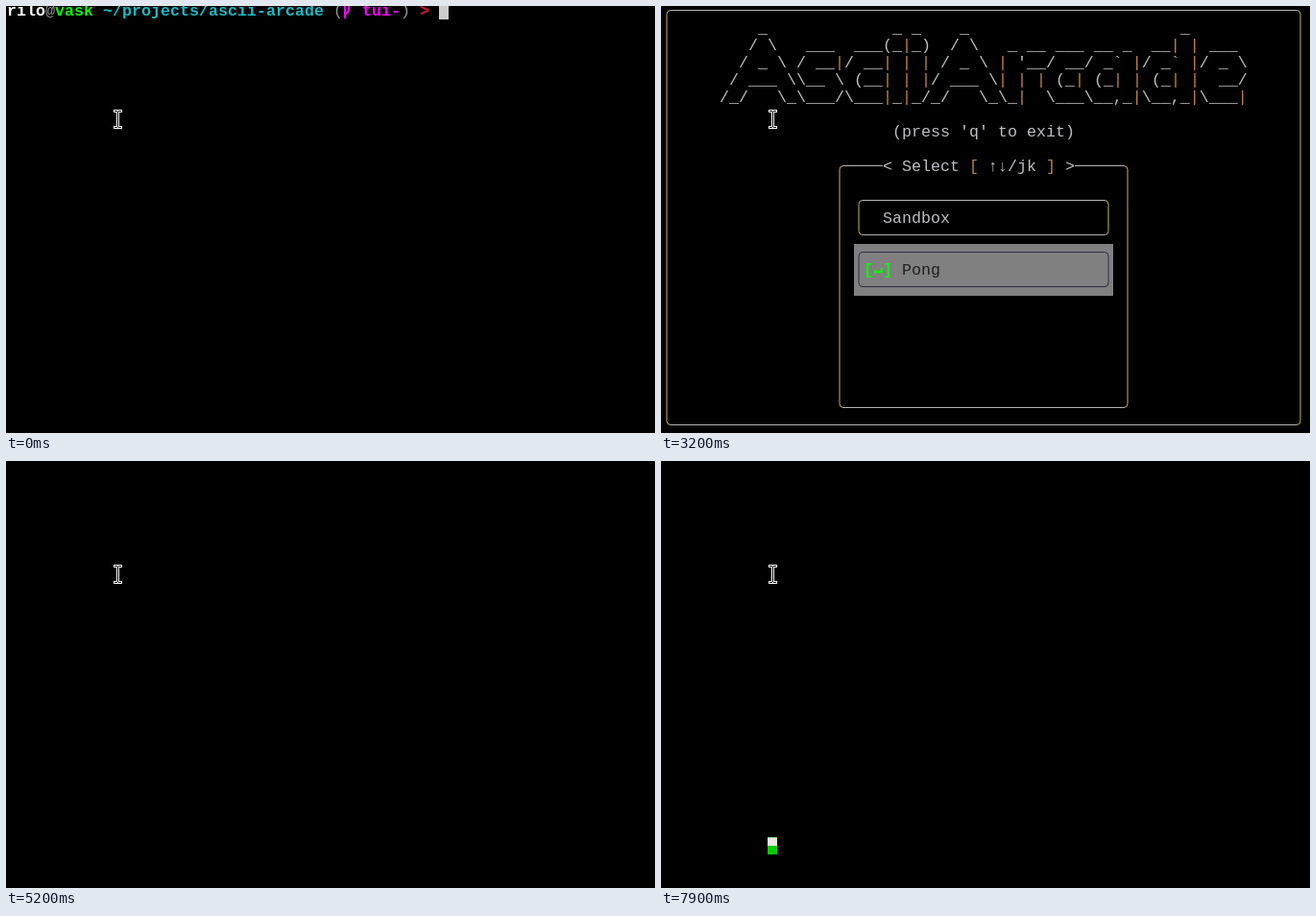
Recreate the animation shown at these times as an HTML page. Size 676 px wide and 445 px high, loop 8000 ms.

```html
<!DOCTYPE html>
<html lang="en">
<head>
<meta charset="utf-8">
<title>Terminal arcade</title>
<style>
  html, body { margin: 0; width: 100%; height: 100%; overflow: hidden; background: #000; }
  svg { display: block; width: 676px; height: 445px; }
  text {
    font: 16.667px "Liberation Mono", "DejaVu Sans Mono", monospace;
    fill: #bebec4;
    white-space: pre;
  }
  #shell text { fill: #94949c; }
  #shell .bold { font-weight: bold; }
  #shell .user { fill: #fff; }
  #shell .host { fill: #0f0; }
  #shell .path { fill: #14bcc4; }
  #shell .branch { fill: #f0f; }
  #shell .mark { fill: #e81230; }
  .bar { fill: #c08440; }
  .side { fill: none; stroke: #c8b860; }
  .edge { stroke: #b4b4b4; }
  .back { fill: none; }
  .enter { fill: #0f0; font-weight: bold; visibility: hidden; }
  .on .back { fill: #808080; }
  .on .side, .on .edge { stroke: #2c2c48; }
  .on .label { fill: #202020; }
  .on .enter { visibility: inherit; }
  #caret { fill: #ccc; }
</style>
</head>
<body>
<svg viewBox="0 0 676 445">
  <defs>
    <path id="beam" d="M113.5 109.5h2M117.5 109.5h2M116.5 110.5v15M113.5 126.5h2M117.5 126.5h2"/>
  </defs>
  <g id="shell">
    <text class="bold user" x="1" y="10">rilo</text>
    <text x="41" y="10">@</text>
    <text class="bold host" x="51" y="10">vask</text>
    <text class="bold path" x="101" y="10">~/projects/ascii-arcade</text>
    <text x="341" y="10">(</text>
    <path d="M353 0V13M357 0V5L353 9" fill="none" stroke="#f0f" stroke-width="2"/>
    <text class="bold branch" x="371" y="10">tui-</text>
    <text x="411" y="10">)</text>
    <text class="bold mark" x="431" y="10">&gt;</text>
    <text id="typed" x="451" y="10"></text>
    <rect id="caret" width="10" height="18"/>
  </g>
  <g id="menu"></g>
  <g id="ball">
    <rect width="10" height="18" fill="#00cd00"/>
    <rect width="10" height="9" fill="#e8e6e0"/>
    <rect width="10" height="1" fill="#8ee08e"/>
  </g>
  <g stroke-linecap="square">
    <use href="#beam" stroke="#fff" stroke-width="3"/>
    <use href="#beam" stroke="#000"/>
  </g>
</svg>

<script type="text/plain" id="logo">
    _             _ _    _                      _
   / \   ___  ___(_|_)  / \   _ __ ___ __ _  __| | ___
  / _ \ / __|/ __| | | / _ \ | '__/ __/ _` |/ _` |/ _ \
 / ___ \\__ \ (__| | |/ ___ \| | | (_| (_| | (_| |  __/
/_/   \_\___/\___|_|_/_/   \_\_|  \___\__,_|\__,_|\___|
</script>

<script>
const LOOP = 8000;
const COMMAND = 'cargo run';
const $ = id => document.getElementById(id);

// Terminal grid: 10 x 18 cells, the first row partly above the stage.
const cellX = col => 1 + 10 * col;
const cellY = row => 18 * row - 4;
const text = (col, row, str, cls = '') =>
  `<text class="${cls}" x="${cellX(col)}" y="${cellY(row) + 14}">${str}</text>`;

function frame(c1, r1, c2, r2) {
  const x1 = cellX(c1) + 5, x2 = cellX(c2) + 5;
  const y1 = cellY(r1) + 8.5, y2 = cellY(r2) + 8.5;
  const edge = y => `<path class="edge" d="M${x1 + 4} ${y}H${x2 - 4}"/>`;
  return `<rect class="side" x="${x1}" y="${y1}" width="${x2 - x1}" height="${y2 - y1}" rx="4"/>`
    + edge(y1) + edge(y2);
}

function item(id, row, name) {
  return `<g id="${id}">
    <rect class="back" x="201" y="${cellY(row)}" width="270" height="54"/>
    ${frame(20, row, 46, row + 2)}
    ${[...'[↵]'].map((ch, i) => text(21 + i, row + 1, ch, 'enter')).join('')}
    ${text(23, row + 1, name, 'label')}
  </g>`;
}

const tint = str => str.replace(/[|[\]]/g, '<tspan class="bar">$&</tspan>');

function logo() {
  return $('logo').textContent.split('\n').slice(1, 6)
    .map((line, i) => text(6, i + 1, tint(line))).join('');
}

$('menu').innerHTML = frame(0, 0, 66, 24) + logo()
  + text(24, 7, "(press 'q' to exit)")
  + frame(18, 9, 48, 23)
  + '<rect x="231" y="160" width="200" height="14"/>'
  + text(23, 9, tint('&lt; Select [ ↑↓/jk ] &gt;'))
  + item('sandbox', 11, 'Sandbox') + item('pong', 14, 'Pong');

const show = (id, on) => $(id).setAttribute('visibility', on ? 'visible' : 'hidden');

function select(id, on) {
  $(id).setAttribute('class', on ? 'on' : '');
  $(id).querySelector('.label').setAttribute('x', cellX(on ? 25 : 23));
}

// One key per tick; the last two land together.
function typedCount(t) {
  const n = Math.max(0, Math.floor((t - 1300) / 100));
  return n < 8 ? n : COMMAND.length;
}

// Falls under gravity, is pushed sideways later, and bounces off row 24.
function ballCell(s) {
  let row = 4 * s * s + 2.2 * s;
  if (row > 24) row = 24 - 0.8 * (row - 24);
  const push = Math.max(0, s - 0.8);
  return [Math.floor(5.1 * push * push), Math.floor(row)];
}

function draw() {
  const t = Math.floor(performance.now() % LOOP / 100) * 100;

  show('shell', t < 2500);
  const count = typedCount(t);
  $('typed').textContent = COMMAND.slice(0, count);
  const entered = t >= 2400;
  $('caret').setAttribute('x', cellX(entered ? 0 : 45 + count));
  $('caret').setAttribute('y', cellY(entered ? 1 : 0));

  show('menu', (t >= 2500 && t < 4000) || (t >= 4400 && t < 5200));
  const onPong = t >= 3200 && t < 4900;
  select('pong', onPong);
  select('sandbox', !onPong);

  show('ball', t >= 5600);
  const [col, row] = ballCell(Math.max(0, t - 5600) / 1000);
  $('ball').setAttribute('transform', `translate(${cellX(col)} ${cellY(row)})`);

  requestAnimationFrame(draw);
}
draw();
</script>
</body>
</html>
```
